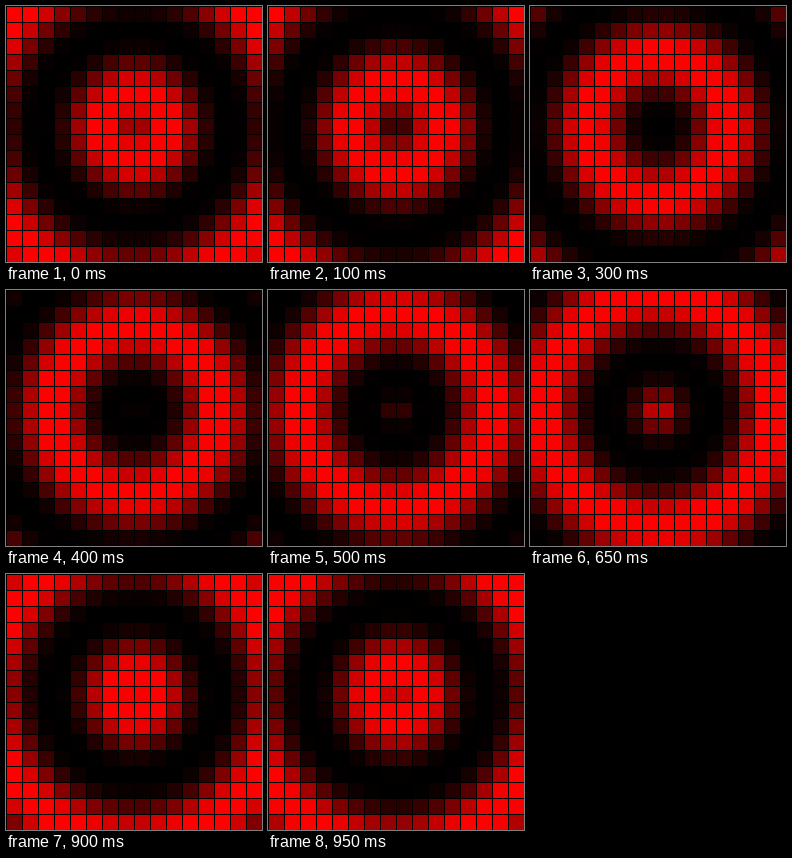
An HTML page with a canvas that plays this animation: 256x256 px, repeating every 1 s.

```html
<!DOCTYPE html>
<html lang="en">
<head>
<meta charset="utf-8">
<title>Red ripple</title>
<style>
  html, body { margin: 0; width: 100%; height: 100%; overflow: hidden; background: #000; }
  canvas { display: block; width: 100%; height: 100%; image-rendering: pixelated; }
</style>
</head>
<body>
<canvas id="stage" width="256" height="256"></canvas>
<script>
const ctx = document.getElementById('stage').getContext('2d');
const CELLS = 16, PITCH = 16;
const CENTER_X = 7.5, CENTER_Y = 7;
const WAVE = 8, TROUGH = 6;
const LOOP = 1000, STEP = 50;

// Red level at a distance from the center; the dark ring travels outwards.
function level(dist, phase) {
  const angle = 2 * Math.PI * ((dist - TROUGH) / WAVE - phase);
  const swell = (1 - Math.cos(angle)) / 2;
  return Math.min(255, Math.round(278 * Math.pow(swell, 1.5)));
}

function draw(phase) {
  ctx.fillStyle = '#000';
  ctx.fillRect(0, 0, 256, 256);
  for (let row = 0; row < CELLS; row++) {
    for (let col = 0; col < CELLS; col++) {
      const dist = Math.hypot(col - CENTER_X, row - CENTER_Y);
      ctx.fillStyle = `rgb(${level(dist, phase)}, 0, 0)`;
      ctx.fillRect(col * PITCH + 1, row * PITCH + 1, PITCH - 1, PITCH - 1);
    }
  }
}

const start = performance.now();
let last = -1;

function tick() {
  const time = Math.max(0, performance.now() - start) % LOOP;
  const step = Math.floor(time / STEP);
  if (step !== last) {
    last = step;
    draw(step * STEP / LOOP);
  }
  requestAnimationFrame(tick);
}
tick();
</script>
</body>
</html>
```
